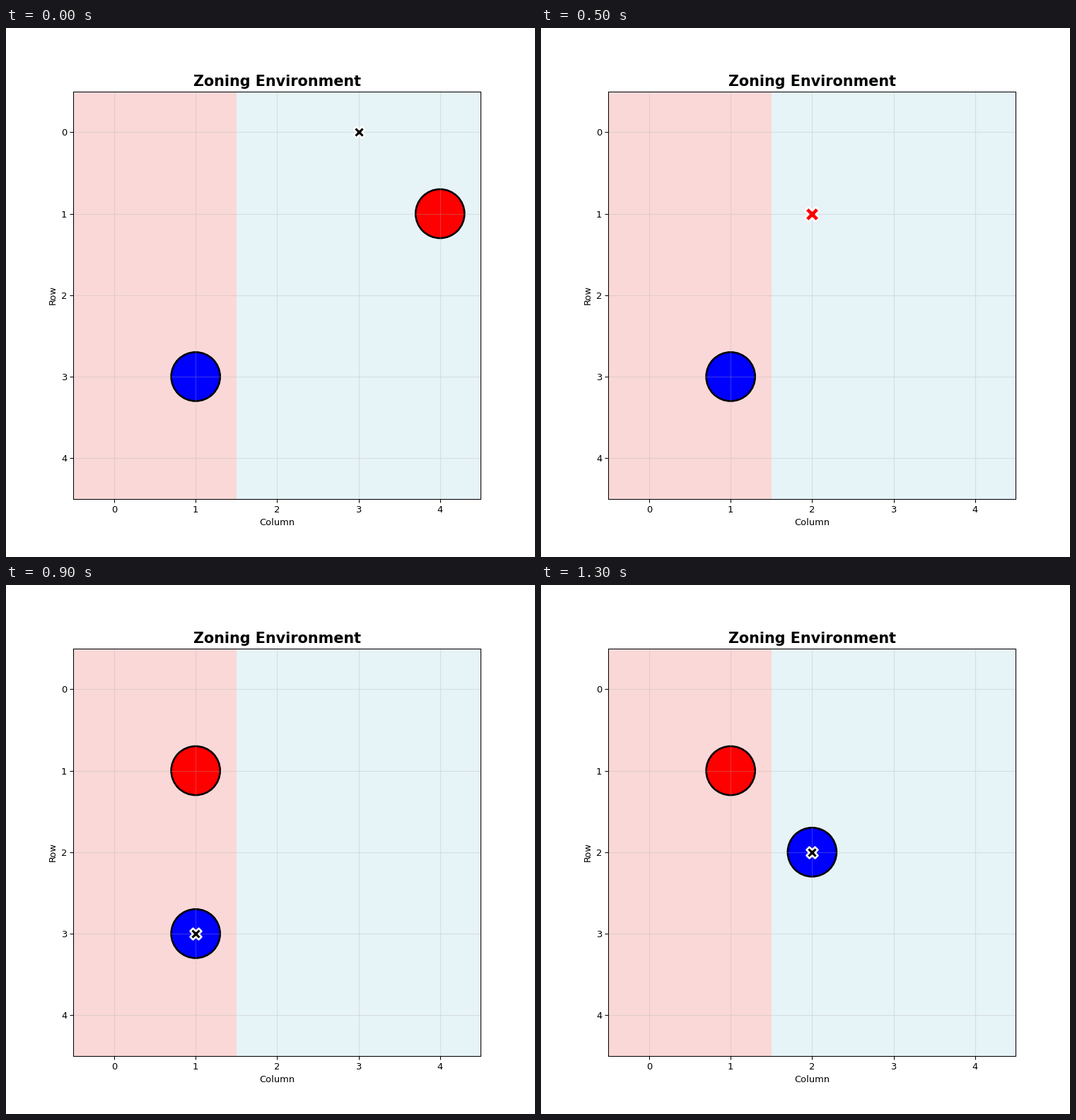
Recreate the animation shown at these times as a matplotlib script. Size 748 by 748 pixels, loop 1400 ms.

```python
import matplotlib.pyplot as plt
from matplotlib.animation import FuncAnimation
from matplotlib.patches import Circle, Rectangle

SIZE = 5
STEP_MS = 100

# One agent action per step: moves by letter, plus picking up and dropping.
ACTIONS = ["down", "right", "pick", "left", "left", "left", "drop",
           "down", "down", "pick", "up", "right", "drop"]
MOVES = {"up": (0, -1), "down": (0, 1), "left": (-1, 0), "right": (1, 0)}


def simulate():
    """Return (agent, held colour, disc positions) for every step."""
    agent, held = (3, 0), None
    discs = {"red": (4, 1), "blue": (1, 3)}
    states = [(agent, held, dict(discs))]
    for action in ACTIONS:
        if action in MOVES:
            dx, dy = MOVES[action]
            agent = (agent[0] + dx, agent[1] + dy)
        elif action == "pick":
            held = next(c for c, cell in discs.items() if cell == agent)
            del discs[held]
        else:
            discs[held] = agent
            held = None
        states.append((agent, held, dict(discs)))
    return states


states = simulate()

plt.rcParams["font.family"] = "DejaVu Sans"
fig, ax = plt.subplots(figsize=(8, 8), dpi=93.5)
ax.set_xlim(-0.5, SIZE - 0.5)
ax.set_ylim(SIZE - 0.5, -0.5)
ax.set_aspect("equal")
ax.set_xticks(range(SIZE))
ax.set_yticks(range(SIZE))
ax.grid(True, alpha=0.3)
ax.set_xlabel("Column")
ax.set_ylabel("Row")
ax.set_title("Zoning Environment", fontsize=16, fontweight="bold")

for left, width, color in ((-0.5, 2, "lightcoral"), (1.5, 3, "lightblue")):
    ax.add_patch(Rectangle((left, -0.5), width, SIZE, facecolor=color,
                           alpha=0.3, linewidth=0, zorder=0))

# Discs stay below the grid lines, the agent above everything.
discs = {color: ax.add_patch(Circle((0, 0), 0.3, facecolor=color,
                                    edgecolor="black", linewidth=2, zorder=1))
         for color in ("red", "blue")}
agent_mark = ax.scatter([3], [0], marker="X", s=150, c="black",
                        edgecolors="white", linewidths=2, zorder=5)


def update(step):
    agent, held, placed = states[step]
    for color, disc in discs.items():
        disc.set_visible(color in placed)
        if color in placed:
            disc.center = placed[color]
    agent_mark.set_offsets([agent])
    agent_mark.set_facecolor(held or "black")
    agent_mark.set_sizes([250 if held else 150])
    return [*discs.values(), agent_mark]


anim = FuncAnimation(fig, update, frames=len(states), interval=STEP_MS,
                     repeat=True, repeat_delay=0, blit=False)
plt.show()
```
